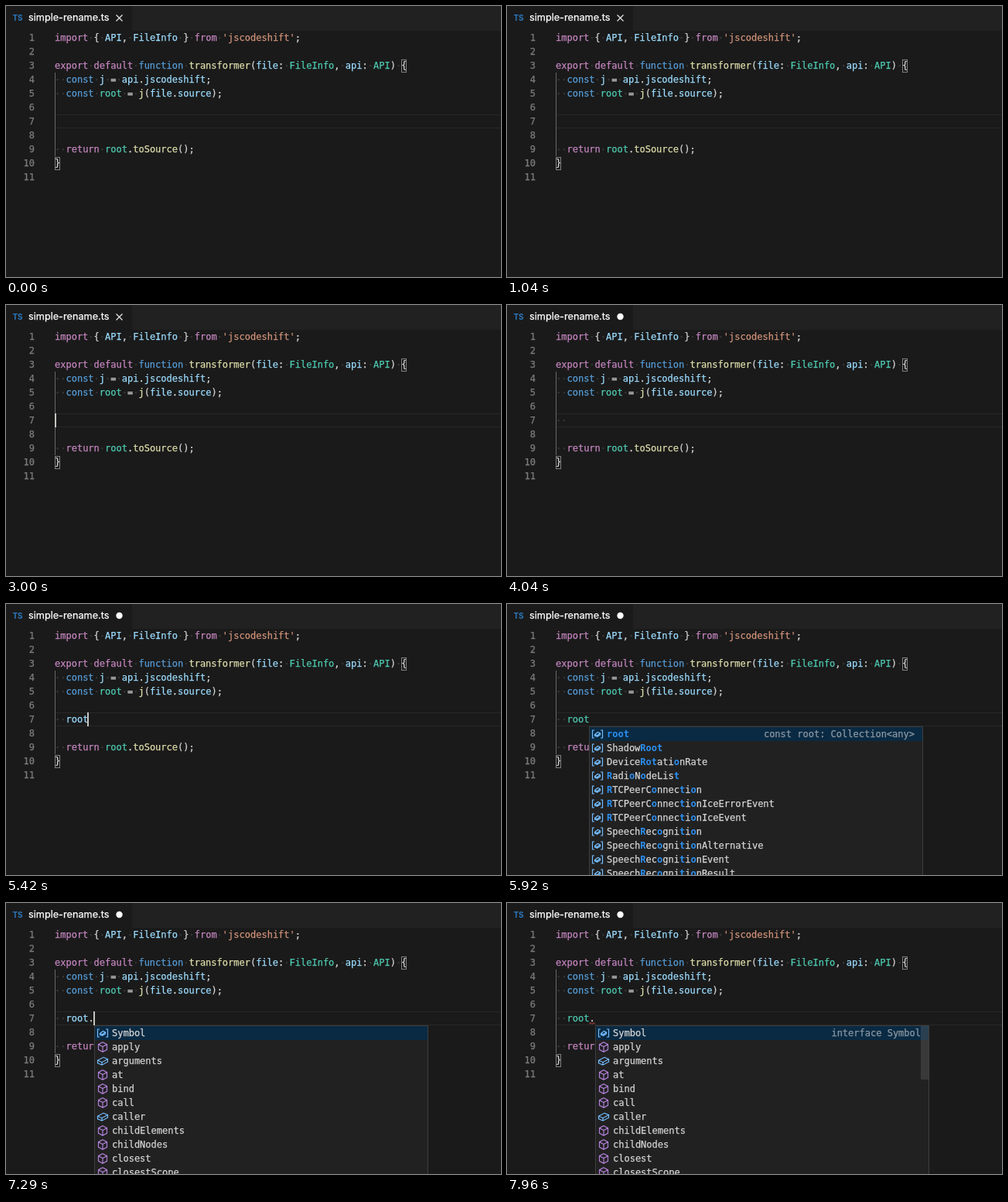
An HTML page for the animation above (8000 ms loop, 640 by 350 pixels).

```html
<!DOCTYPE html>
<html lang="en">
<head>
<meta charset="utf-8">
<title>Code editor</title>
<style>
html, body { margin: 0; width: 100%; height: 100%; overflow: hidden; background: #1a1a1a; }
#stage { position: relative; width: 640px; height: 350px; overflow: hidden; background: #1a1a1a;
  color: #d4d4d4; font: 12px/18px "DejaVu Sans Mono", monospace; white-space: pre; -webkit-text-stroke: .25px; }
#stage div, #stage svg { position: absolute; }
#code, #brackets { left: 0; top: 0; }
i { font-style: normal; color: #3c3c3c; }
b { color: #2a8ff0; -webkit-text-stroke: 0; }
.bar { left: 163px; top: 0; width: 477px; height: 32px; background: #212121; }
.lang { left: 8.5px; top: 6px; color: #2b78bd; font: bold 10px/18px Inter, sans-serif; -webkit-text-stroke: 0; }
.title { left: 29px; top: 6px; color: #fff; font: 12.7px/18px Inter, sans-serif; }
.mark { left: 141px; top: 10px; }
.num { left: 0; width: 37px; text-align: right; color: #7c7c7c; }
.line { left: 63px; }
.current { left: 63px; width: 577px; height: 18px; box-sizing: border-box; border: solid #282828; border-width: 1px 0; }
.guide { left: 63px; top: 86px; width: 1px; height: 108px; }
.bracket { width: 7.2px; height: 17px; box-sizing: border-box; border: 1px solid #808080; }
.cursor { width: 2px; height: 18px; background: #c4c4c0; }
.popup { top: 158px; width: 432px; height: 216px; box-sizing: border-box; background: #212122; border: 1px solid #3e3e3f; }
.row { left: 0; width: 430px; height: 18px; }
.row:first-child { background: #0a2a43; }
.row svg { left: 2px; top: 1px; }
.label { left: 22px; }
.detail { right: 10px; color: #8b98a3; }
.thumb { right: 0; top: 0; width: 10px; height: 69px; background: rgba(110, 110, 110, .32); }
.kw { color: #c586c0; } .def { color: #569cd6; } .var { color: #9cdcfe; }
.type { color: #4ec9b0; } .fn { color: #dcdcaa; } .str { color: #ce9178; }
</style>
</head>
<body>
<div id="stage">
  <div class="bar"></div>
  <div class="lang">TS</div>
  <div class="title">simple-rename.ts</div>
  <svg class="mark" id="close" width="11" height="11"><path d="M1.5 1.5l8 8m0-8l-8 8" stroke="#e4e4e4" stroke-width="1.2"/></svg>
  <svg class="mark" id="dirty" width="11" height="11"><circle cx="5.5" cy="5" r="4.2" fill="#fff"/></svg>
  <div class="current" id="current"></div>
  <div id="code"></div>
  <div class="guide" id="guide"></div>
  <div id="brackets">
    <div class="bracket" style="left:510.8px;top:69px"></div>
    <div class="bracket" style="left:63px;top:195px"></div>
  </div>
  <svg id="squiggle" style="left:106px;top:153px" width="9" height="5"><path d="M0 3.5l2-2 2 2 2-2 2 2" fill="none" stroke="#d84a4a"/></svg>
  <div class="cursor" id="cursor"></div>
  <div class="popup" id="wordPopup" style="left:106px"></div>
  <div class="popup" id="memberPopup" style="left:114px"></div>
</div>
<script>
const LOOP = 8000, CHAR = 7.224, LEFT = 63;
const $ = id => document.getElementById(id);
const lineTop = n => 14 + 18 * n;
const escapeHtml = s => s.replace(/&/g, '&amp;').replace(/</g, '&lt;');
const dots = s => s.replace(/ /g, '<i>·</i>');

// Markup: {class|text} colours a token, spaces become whitespace dots.
const paint = s => s.split(/(\{\w+\|[^}]*\})/).map(part => {
  const token = part.match(/^\{(\w+)\|([^}]*)\}$/);
  return token ? `<span class="${token[1]}">${dots(token[2])}</span>` : dots(part);
}).join('');

const source = [
  "{kw|import} { {var|API}, {var|FileInfo} } {kw|from} {str|'jscodeshift'};",
  '',
  '{kw|export} {kw|default} {def|function} {fn|transformer}({var|file}: {type|FileInfo}, {var|api}: {type|API}) {',
  '  {def|const} {var|j} = {var|api}.{var|jscodeshift};',
  '  {def|const} {type|root} = {fn|j}({var|file}.{var|source});',
  '', '', '',
  '  {kw|return} {type|root}.{fn|toSource}();',
  '}',
  ''
];
$('code').innerHTML = source.map((text, k) => {
  const top = `style="top:${lineTop(k + 1)}px"`;
  return `<div class="num" ${top}>${k + 1}</div><div class="line" id="line${k + 1}" ${top}>${paint(text)}</div>`;
}).join('');

const svgIcon = (color, path) =>
  `<svg width="16" height="16" fill="none" stroke="${color}" stroke-width="1.2"><path d="${path}"/></svg>`;
const icons = {
  variable: svgIcon('#75beff', 'M4 3H1.5v10H4M12 3h2.5v10H12M4.5 8.5l4-3 3 1.3v2l-4 2.5-3-1.3zl3 1.3 4-3'),
  method: svgIcon('#b180d7', 'M8 1.8l5.5 2.9v6.6L8 14.2l-5.5-2.9V4.7zM2.5 4.7L8 7.6l5.5-2.9M8 7.6v6.6'),
  field: svgIcon('#75beff', 'M1.5 7.3l7.5-4 5.5 2.4v3.5l-7.5 4-5.5-2.4zl5.5 2.4 7.5-4M7 9.7v3.5')
};

// Marks the letters of the query, in order, or returns null when they do not all occur.
function highlight(word, query) {
  let next = 0;
  const html = [...word].map(c => c.toLowerCase() === query[next] ? (next++, `<b>${c}</b>`) : c).join('');
  return next === query.length ? html : null;
}

const row = (icon, label, k, detail) =>
  `<div class="row" style="top:${18 * k}px">${icons[icon]}<div class="label">${label}</div>` +
  (k ? '' : `<div class="detail">${escapeHtml(detail)}</div>`) + '</div>';

const words = ('root ShadowRoot DeviceRotationRate RadioNodeList RTCPeerConnection RTCPeerConnectionIceErrorEvent ' +
  'RTCPeerConnectionIceEvent SpeechRecognition SpeechRecognitionAlternative SpeechRecognitionEvent SpeechRecognitionResult').split(' ');
$('wordPopup').innerHTML = words.map((word, k) =>
  row('variable', highlight(word, 'roto') || highlight(word, 'root'), k, 'const root: Collection<any>')).join('');

const members = 'Symbol apply arguments at bind call caller childElements childNodes closest closestScope'.split(' ');
const memberIcons = { Symbol: 'variable', arguments: 'field', caller: 'field' };
$('memberPopup').innerHTML = members.map((name, k) =>
  row(memberIcons[name] || 'method', name, k, 'interface Symbol')).join('') + '<div class="thumb"></div>';

// Cursor actions: [time, line, typed text]; each one restarts the blink.
const actions = [
  [-700, 7, ''], [1960, 11, ''], [2800, 7, ''], [3480, 7, '  '],
  [4720, 7, '  r'], [4840, 7, '  ro'], [5000, 7, '  roo'], [5160, 7, '  root'], [7000, 7, '  root.']
];
const show = (el, on) => { el.style.visibility = on ? 'inherit' : 'hidden'; };
const within = (t, from, to) => t >= from && t < to;
const wordDetail = $('wordPopup').querySelector('.detail');
const memberDetail = $('memberPopup').querySelector('.detail');
const thumb = $('memberPopup').querySelector('.thumb');
let shownLine = '';

function render(t) {
  const [time, line, typed] = actions.filter(a => a[0] <= t).pop();
  const inBlock = line === 7;
  const resolved = within(t, 5900, 7000) || t >= 7600;

  const html = paint(typed.replace(/r\w*/, word => `{${resolved ? 'type' : 'var'}|${word}}`));
  if (html !== shownLine) $('line7').innerHTML = shownLine = html;

  $('current').style.top = $('cursor').style.top = lineTop(line) + 'px';
  $('cursor').style.left = LEFT + typed.length * CHAR - (typed ? 1 : 0) + 'px';
  show($('cursor'), (t - time) % 1000 < 500);
  show($('brackets'), inBlock);
  $('guide').style.background = inBlock ? '#686868' : '#3c3c3c';
  show($('close'), t < 3480);
  show($('dirty'), t >= 3480);

  show($('wordPopup'), within(t, 5520, 7000));
  show(wordDetail, t >= 5900);
  show($('memberPopup'), t >= 7180);
  show(memberDetail, t >= 7600);
  show(thumb, t >= 7600);
  show($('squiggle'), t >= 7600);
}

const start = performance.now();
function tick() {
  render((performance.now() - start) % LOOP);
  requestAnimationFrame(tick);
}
tick();
</script>
</body>
</html>
```
